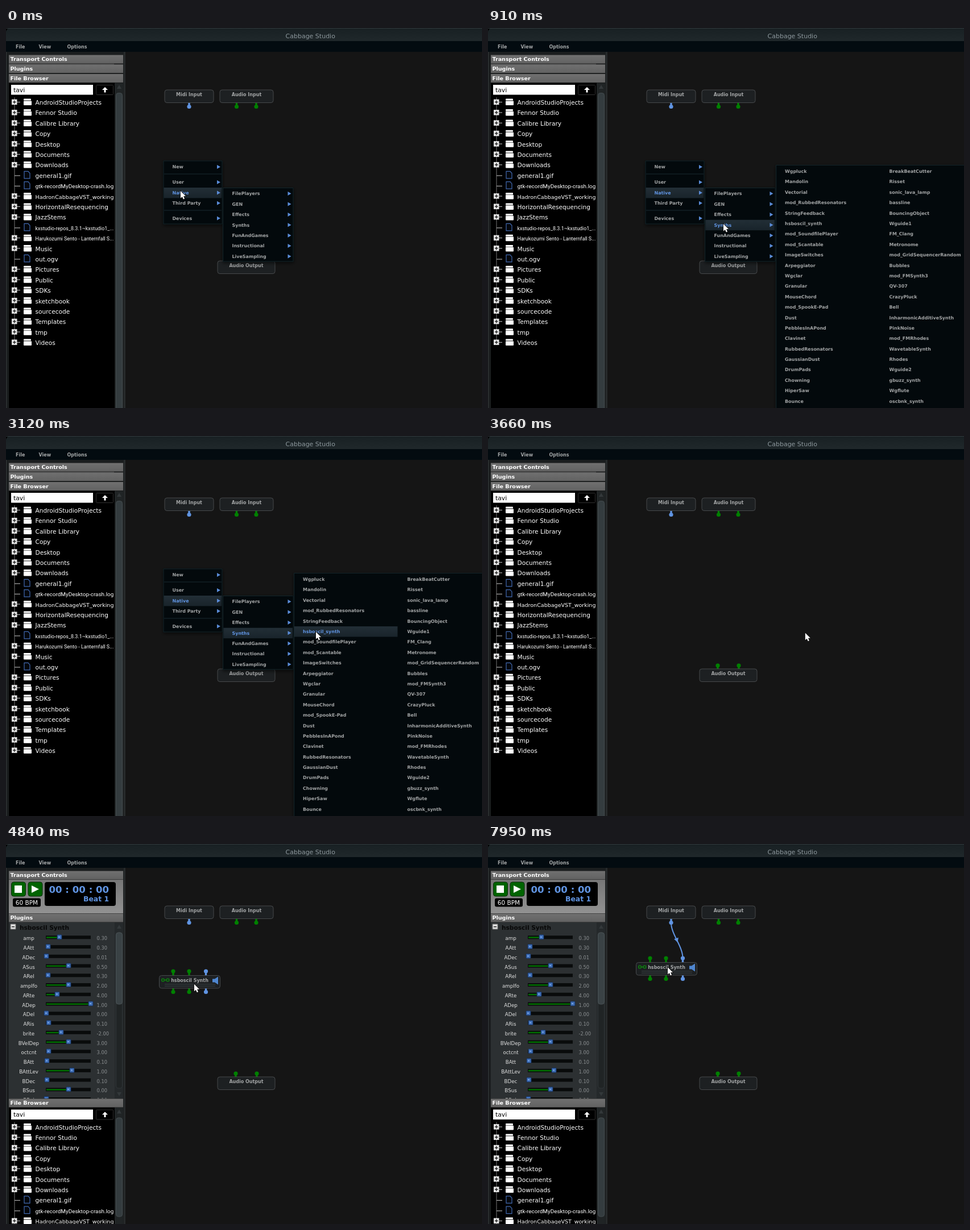
Animation of 837x669 px, one loop 8 s. Source, as an HTML page with a canvas:

```html
<!DOCTYPE html>
<html lang="en">
<head>
<meta charset="utf-8">
<title>Cabbage Studio</title>
<style>
html, body { margin: 0; width: 837px; height: 669px; overflow: hidden; background: #151515; }
canvas { display: block; }
</style>
</head>
<body>
<canvas id="stage" width="837" height="669"></canvas>
<script>
const ctx = document.getElementById('stage').getContext('2d');
const LOOP = 8000, W = 837, H = 669;
const BLUE = '#6094e2', GREEN = '#008000', GREY = '#a3a5a6', ROW = 18.39;

const FILES = ['AndroidStudioProjects', 'Fennor Studio', 'Calibre Library', 'Copy', 'Desktop', 'Documents',
  'Downloads', 'general1.gif', 'gtk-recordMyDesktop-crash.log', 'HadronCabbageVST_working',
  'HorizontalResequencing', 'JazzStems', 'kxstudio-repos_8.3.1~kxstudio1_...',
  'Harukozumi Sento - Lanternfall S...', 'Music', 'out.ogv', 'Pictures', 'Public', 'SDKs', 'sketchbook',
  'sourcecode', 'Templates', 'tmp', 'Videos'];
const PLAIN = [7, 8, 12, 15];

// name, value, thumb position
const PARAMS = [['amp', '0.30', 94], ['AAtt', '0.30', 74], ['ADec', '0.01', 71], ['ASus', '0.50', 110],
  ['ARel', '0.30', 74], ['amplfo', '2.00', 110], ['ARte', '4.00', 90], ['ADep', '1.00', 149],
  ['ADel', '0.00', 71], ['ARis', '0.10', 75], ['brite', '-2.00', 97], ['BVelDep', '3.00', 110],
  ['octcnt', '3.00', 75], ['BAtt', '0.10', 72], ['BAttLev', '1.00', 116], ['BDec', '0.10', 72],
  ['BSus', '0.00', 110], ['BRel', '0.10', 71]];

const CATEGORIES = 'FilePlayers GEN Effects Synths FunAndGames Instructional LiveSampling'.split(' ');
const GENS = ('GEN33 GEN20 GEN16 FFTSpectrum GEN17 GEN07 GEN21 GEN30 GEN09 Oscilloscope GEN02_MidiMonitor ' +
  'GEN02 GEN10 GEN41 GEN08 GEN05').split(' ');
const SYNTHS = [
  'Wgpluck Mandolin Vectorial mod_RubbedResonators StringFeedback hsboscil_synth mod_SoundfilePlayer ' +
  'mod_Scantable ImageSwitches Arpeggiator Wgclar Granular MouseChord mod_SpookE-Pad Dust PebblesInAPond ' +
  'Clavinet RubbedResonators GaussianDust DrumPads Chowning HiperSaw Bounce',
  'BreakBeatCutter Risset sonic_lava_lamp bassline BouncingObject Wguide1 FM_Clang Metronome ' +
  'mod_GridSequencerRandom Bubbles mod_FMSynth3 QV-307 CrazyPluck Bell InharmonicAdditiveSynth PinkNoise ' +
  'mod_FMRhodes WavetableSynth Rhodes Wguide2 gbuzz_synth Wgflute oscbnk_synth'
].map(s => s.split(' '));

// Key points: time, x, y
const CURSOR = [[0, 307, 287], [50, 307, 287], [92, 400, 287], [230, 400, 287], [300, 412, 306], [560, 424, 312],
  [690, 425, 327], [900, 414, 345], [1110, 414, 345], [1540, 538, 346], [1970, 538, 346], [2050, 543, 345],
  [2260, 543, 345], [2300, 545, 345], [3540, 545, 345], [3640, 568, 350], [4140, 326, 273], [4340, 302, 257],
  [4470, 285, 238], [4840, 331, 247], [5160, 315, 169], [5200, 315, 169], [5400, 294, 152], [5620, 322, 138],
  [5760, 322, 138], [6030, 346, 210], [6250, 350, 221], [6450, 350, 221], [6560, 337, 237], [6840, 328, 214],
  [7350, 328, 214], [7390, 317, 217], [7940, 317, 217], [7950, 316, 217]];
const NODE = [[4470, 223, 222], [4840, 269, 231], [6560, 269, 231], [6840, 260, 208]];

function along(keys, t) {
  const i = keys.findIndex(k => k[0] > t);
  if (i < 0) return keys[keys.length - 1].slice(1);
  if (i === 0) return keys[0].slice(1);
  const [t0, x0, y0] = keys[i - 1], [t1, x1, y1] = keys[i], f = (t - t0) / (t1 - t0);
  return [x0 + (x1 - x0) * f, y0 + (y1 - y0) * f];
}
const ramp = (t, a, b) => Math.min(1, Math.max(0, (t - a) / (b - a)));

function rect(x, y, w, h, fill) {
  ctx.fillStyle = fill;
  ctx.fillRect(x, y, w, h);
}
function box(x, y, w, h, r, fill, line, width = 1) {
  ctx.beginPath();
  ctx.roundRect(x, y, w, h, r);
  if (fill) { ctx.fillStyle = fill; ctx.fill(); }
  if (line) { ctx.strokeStyle = line; ctx.lineWidth = width; ctx.stroke(); }
}
function poly(fill, ...p) {
  ctx.beginPath();
  for (let i = 0; i < p.length; i += 2) ctx.lineTo(p[i], p[i + 1]);
  ctx.closePath();
  ctx.fillStyle = fill;
  ctx.fill();
}
function dot(x, y, r, fill) {
  ctx.beginPath();
  ctx.arc(x, y, r, 0, 7);
  ctx.fillStyle = fill;
  ctx.fill();
}
function shade(y0, y1, a, b) {
  const g = ctx.createLinearGradient(0, y0, 0, y1);
  g.addColorStop(0, a);
  g.addColorStop(1, b);
  return g;
}
function setFont(size, bold, family = '"DejaVu Sans"') {
  ctx.font = `${bold ? 'bold ' : ''}${size}px ${family}, sans-serif`;
}
// y is the middle of the capitals
function text(s, x, y, size, fill, bold = false, align = 'left') {
  setFont(size, bold);
  ctx.textAlign = align;
  ctx.fillStyle = fill;
  ctx.fillText(s, x, y + size * 0.36);
}
function clipped(x, y, w, h, draw) {
  if (h <= 0) return;
  ctx.save();
  ctx.beginPath();
  ctx.rect(x, y, w, h);
  ctx.clip();
  draw();
  ctx.restore();
}

function frame() {
  rect(0, 0, W, H, '#151515');
  rect(0, 0, W, 24, shade(0, 24, '#182023', '#20282b'));
  poly('#000', 0, 0, 6, 0, 2, 2, 0, 6);
  rect(0, 0, W, 1, '#30383b');
  rect(0, 23, W, 19, '#030b10');
  text('Cabbage Studio', 491.5, 14.5, 11, '#8d989d');
  text('File', 17, 33, 8, GREY, true);
  text('View', 57.5, 33, 8, GREY, true);
  text('Options', 107.5, 33, 8, GREY, true);
  rect(0, 42, 210, H, '#1b1e1f');
  rect(0, 42, 1, H, '#34393b');
  rect(207, 42, 3, H, '#272a2b');
}

function header(name, y) {
  rect(5, y - 8, 201, 16, '#151515');
  rect(5, y - 7.5, 201, 15, shade(y - 8, y + 8, '#717171', '#616161'));
  text(name, 7.5, y, 9.55, '#fff', true);
}
function arrowUp(y, fill = '#33383a') { poly(fill, 195, y + 3, 203, y + 3, 199, y - 4); }
function arrowDown(y, fill = '#33383a') { poly(fill, 195, y - 3, 203, y - 3, 199, y + 4); }

function transport(top, h, full) {
  clipped(5, top, 201, h, () => {
    const w = full ? 201 : 185;
    rect(5, top, 201, h, '#222627');
    rect(5, top, w, 60, shade(top, top + 60, '#777', '#929292'));
    for (const x of [9, 38.5]) box(x + .5, 67, 25, 25, 4, '#006400', '#0b2a0b');
    rect(15, 73, 13, 13, '#fff');
    poly('#fff', 45, 73, 58, 79.5, 45, 86);
    const right = full ? 193 : 178;
    box(68, 67, right - 68, 42, 4, '#000');
    text('00 : 00 : 00', 75.5, 80.5, full ? 16.6 : 14.3, BLUE, true);
    text('Beat 1', right - 12, 97, 12.4, BLUE, true, 'right');
    box(12, 95.5, 49, 15, 3, '#000');
    text('60 BPM', 36.5, 103.5, 10.5, '#fff', false, 'center');
    if (!full) { arrowUp(70, '#363b3d'); arrowDown(86, '#363b3d'); }
  });
}

function plugins(mid, top, h) {
  clipped(5, top, 201, h, () => {
    rect(5, top, 201, h, '#2c3032');
    rect(191, top, 15, h, '#25292b');
    box(8, mid + 11, 9, 9, 0, '#ddd', '#777');
    rect(10, mid + 15, 5, 1.4, '#222');
    text('hsboscil Synth', 24, mid + 17.5, 10.6, '#080808', true);
    PARAMS.forEach(([name, value, x], i) => {
      const y = mid + 36.3 + i * 16.75;
      text(name, 40, y, 8.7, '#e2e2e2', false, 'center');
      rect(70, y - 5, 79, 6, '#090b0b');
      rect(71, y - 3, x - 71, 2.5, '#007000');
      box(x - 4, y - 6.5, 8, 8, 1, '#3d6cb4', '#16305a');
      rect(x - 2, y - 3.5, 3, 2, '#79a5e6');
      text(value, 159.5, y, 8.3, '#8b8f91');
    });
    arrowUp(mid + 16);
    arrowDown(top + h - 8);
    const track = h - 36;
    if (track > 0) {
      box(193.5, mid + 26, 11, track, 4, '#202425', '#303537');
      box(193.5, mid + 26, 11, Math.max(12, track * (h / 674)), 4, '#3a4245', '#4a5255');
    }
  });
}

function fileRow(name, i, y) {
  ctx.fillStyle = '#777';
  ctx.fillRect(14.5, y - 9, 1, i === FILES.length - 1 ? 9 : ROW);
  if (PLAIN.includes(i)) {
    rect(15, y - .5, 10, 1.2, '#aaa');
    ctx.beginPath();
    [[32, -7.5], [39, -7.5], [42, -4], [42, 5], [32, 5]].forEach(([x, d]) => ctx.lineTo(x, y + d));
    ctx.closePath();
    ctx.fillStyle = '#05070c';
    ctx.fill();
    ctx.strokeStyle = '#4169b0';
    ctx.lineWidth = 1.2;
    ctx.stroke();
  } else {
    rect(19, y - 1.2, 6, 1.2, '#aaa');
    rect(10, y - 5.5, 9.5, 9.5, '#e4e4e4');
    rect(12, y - 1.4, 5.5, 1.4, '#222');
    rect(14.1, y - 3.5, 1.4, 5.5, '#222');
    box(31, y - 6.5, 13, 3, 1, '#fff');
    box(31, y - 2.8, 14, 7.8, 1, '#fff');
    rect(31, y - 3.6, 13, 1, '#777');
  }
  // Long names take a narrower face and shrink to the column
  let size = 10.6, family;
  setFont(size);
  if (ctx.measureText(name).width > 160) setFont(size, false, family = 'Roboto');
  size *= Math.min(1, 138 / ctx.measureText(name).width);
  setFont(size, false, family);
  ctx.textAlign = 'left';
  ctx.fillStyle = '#fff';
  ctx.fillText(name, 51.5, y + 4);
}

function browser(mid, open) {
  const top = mid + 8;
  rect(5, top, 186, H - top, '#000');
  rect(191, top, 15, H - top, '#202425');
  box(9, mid + 11.5, 144, 17.5, 0, '#fff');
  text('tavi', 13, mid + 20.5, 10.8, '#000');
  box(158.5, mid + 12, 30, 17, 1, '#000', '#303030');
  poly('#fff', 174, mid + 15.5, 179, mid + 20.5, 169, mid + 20.5);
  rect(172.5, mid + 20, 3, 5, '#fff');
  FILES.forEach((name, i) => fileRow(name, i, mid + 42.6 + i * ROW));
  arrowUp(mid + 15.5);
  const thumb = mid + 26;
  box(193.5, thumb, 11, 700 - 44 * open - thumb, 4, '#343c3f', '#444c4f');
}

function sidebar(open) {
  const plug = 71.7 + 58.3 * open, file = 88.5 + 367.5 * open;
  transport(63, plug - 8 - 63, open === 1);
  plugins(plug, plug + 8, file - plug - 16);
  browser(file, open);
  header('Transport Controls', 55);
  header('Plugins', plug);
  header('File Browser', file);
}

function pin(x, y, stem, fill) {
  rect(x - 1.7, Math.min(y, stem), 3.4, Math.abs(stem - y), fill);
  dot(x, y, 3.6, fill);
}
function node(name, x, y, w) {
  box(x + .5, y + .5, w - 1, 22.5, 4, '#1d2022', '#46494b');
  text(name, x + w / 2, y + 9, 8, GREY, true, 'center');
}
function synth(x, y) {
  [25, 53, 82.5].forEach((dx, i) => {
    const fill = i === 2 ? BLUE : GREEN;
    pin(x + dx, y - 7, y, fill);
    pin(x + dx, y + 29.5, y + 23, fill);
  });
  node('hsboscil Synth', x, y, 108);
  for (const dy of [15, 18.5]) rect(x + 10, y + dy, 89, 1.5, '#303638');
  ctx.strokeStyle = '#0a8a0a';
  ctx.lineWidth = 1.3;
  ctx.beginPath();
  ctx.arc(x + 7, y + 8.5, 2.4, 0, 7);
  ctx.moveTo(x + 9.4, y + 8.5);
  ctx.lineTo(x + 13, y + 8.5);
  ctx.moveTo(x + 17.8, y + 8.5);
  ctx.arc(x + 15.4, y + 8.5, 2.4, 0, 7);
  ctx.stroke();
  poly('#4f86cf', x + 94, y + 6.5, x + 98, y + 6.5, x + 104, y + 2.5, x + 104, y + 16.5, x + 98, y + 12.5, x + 94, y + 12.5);
}
function wire(x2, y2) {
  const x1 = 322, y1 = 138.5, dy = y2 - y1;
  ctx.beginPath();
  ctx.moveTo(x1, y1);
  ctx.bezierCurveTo(x1, y1 + dy * .33, x2, y1 + dy * .66, x2, y2);
  ctx.strokeStyle = BLUE;
  ctx.lineWidth = 2;
  ctx.stroke();
  if (dy < 6) return;
  ctx.save();
  ctx.translate((x1 + x2) / 2, y1 + dy / 2);
  ctx.rotate(Math.atan2(dy, x2 - x1));
  poly(BLUE, -4, 4, -4, -4, 4, 0);
  ctx.restore();
}

function graph(t, cx, cy) {
  pin(322, 138.5, 131, BLUE);
  for (const x of [405.5, 440]) pin(x, 138.5, 131, GREEN);
  for (const x of [404, 441]) pin(x, 404, 411, GREEN);
  node('Midi Input', 278.5, 108.5, 87);
  node('Audio Input', 375.5, 108.5, 95);
  node('Audio Output', 371.5, 409.5, 102);
  if (t < 3900) return;
  const [x, y] = along(NODE, t);
  synth(x, y);
  if (t >= 6250) wire(x + 82.5, y - 7);
  else if (t >= 5760) wire(cx, cy);
}

function panel(x, y, w, h) {
  ctx.save();
  ctx.shadowColor = 'rgba(0,0,0,.6)';
  ctx.shadowBlur = 6;
  ctx.shadowOffsetY = 2;
  rect(x, y, w, h, '#03090c');
  ctx.restore();
  box(x + .5, y + .5, w - 1, h - 1, 0, null, '#14262b');
}
function item(name, x, y, w, on, more) {
  if (on) rect(x + 1, y - 9, w - 2, 18.4, shade(y - 9, y + 9, '#222e36', '#19242b'));
  text(name, x + 16, y, 7.95, on ? BLUE : GREY, true);
  if (more) poly('#5a8cd8', x + w - 9.5, y - 3.5, x + w - 3.5, y, x + w - 9.5, y + 3.5);
}
function menus(t) {
  ctx.globalAlpha = 1 - ramp(t, 3140, 3330);
  panel(276.5, 233.5, 104, 112);
  for (const y of [257, 321]) rect(278, y - .5, 101, 1, '#1b2a30');
  [['New', 244.5], ['User', 271.5], ['Native', 290], ['Third Party', 308.3], ['Devices', 335]]
    .forEach(([name, y]) => item(name, 276.5, y, 104, name === 'Native', true));

  const chosen = t < 90 ? -1 : t < 290 ? 0 : t < 730 ? 1 : t < 870 ? 2 : 3;
  panel(381, 281, 124.5, 130.5);
  CATEGORIES.forEach((name, i) => item(name, 381.5, 291.6 + i * ROW, 123.5, i === chosen, true));

  if (t >= 400 && t < 730) {
    panel(506, 300.5, 155, 297.5);
    GENS.forEach((name, i) => item(name, 506, 311.6 + i * ROW, 155));
  }
  if (t >= 900) {
    panel(506, 241, 400, 500);
    SYNTHS.forEach((names, col) => names.forEach((name, i) =>
      item(name, 506 + 183.5 * col, 252.2 + i * ROW, 183.5, t >= 1430 && col === 0 && i === 5)));
  }
  ctx.globalAlpha = 1;
}

function pointer(x, y) {
  ctx.beginPath();
  [[0, 0], [0, 12.5], [2.9, 9.9], [4.9, 14.4], [7, 13.5], [5.1, 9.1], [9, 9.1]]
    .forEach(([dx, dy]) => ctx.lineTo(x + dx, y + dy));
  ctx.closePath();
  ctx.strokeStyle = '#111';
  ctx.lineWidth = 1.6;
  ctx.stroke();
  ctx.fillStyle = '#fff';
  ctx.fill();
}

function draw(now) {
  const t = now % LOOP, [x, y] = along(CURSOR, t);
  frame();
  sidebar(ramp(t, 4040, 4235));
  graph(t, x, y);
  if (t < 3330) menus(t);
  pointer(x, y);
  requestAnimationFrame(draw);
}
requestAnimationFrame(draw);
</script>
</body>
</html>
```
